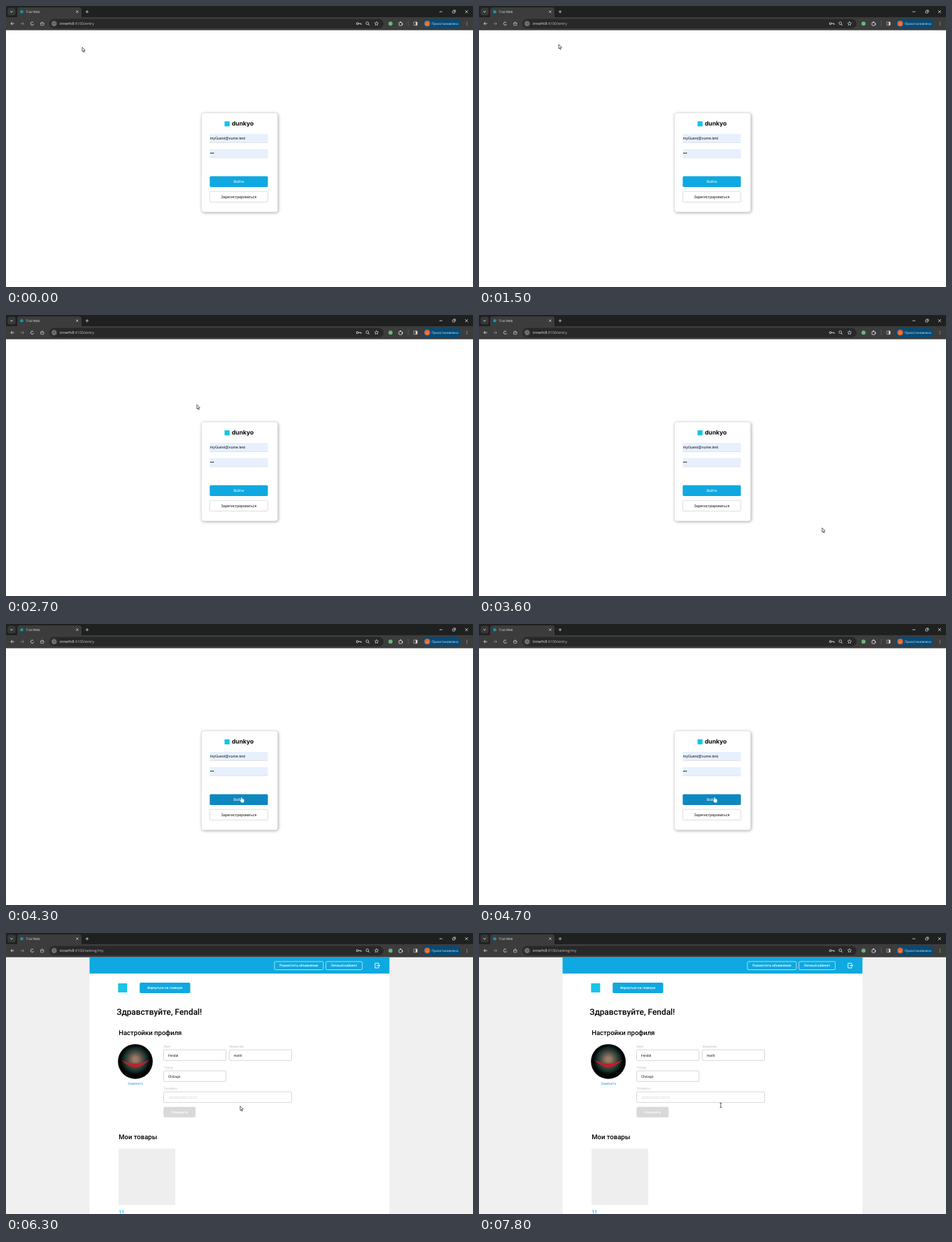
Animation, 668 px wide and 402 px high, one loop 8000 ms. Source, as an HTML page with a canvas:

```html
<!DOCTYPE html>
<html lang="ru">
<head>
<meta charset="utf-8">
<style>
html, body { margin: 0; width: 668px; height: 402px; overflow: hidden; background: #fff; }
canvas { display: block; width: 668px; height: 402px; }
</style>
</head>
<body>
<canvas id="stage"></canvas>
<script>
const W = 668, H = 402, LOOP = 8000, TICK = 100;
const HOVER = 3900, PRESS = 4600, LOADED = 6200, PROFILE = 6300, TEXT_CURSOR = 7700;
const TOP = 34.5, MID = W / 2 - 1;
const ARIAL = '"Liberation Sans", Arial, sans-serif';
const ROBOTO = 'Roboto, sans-serif';
const UI = '"Open Sans", "Noto Sans", sans-serif';
const BLUE = '#0fa8e0', PALE = '#d4d4d4', DIM = '#858585';

const canvas = document.getElementById('stage');
const ratio = window.devicePixelRatio || 1;
canvas.width = W * ratio;
canvas.height = H * ratio;
const c = canvas.getContext('2d');
c.scale(ratio, ratio);
c.textRendering = 'geometricPrecision';

function rect(x, y, w, h, fill, r = 0) {
  c.beginPath();
  c.roundRect(x, y, w, h, r);
  c.fillStyle = fill;
  c.fill();
}

function stroke(color, lw) {
  c.strokeStyle = color;
  c.lineWidth = lw;
  c.stroke();
}

function frame(x, y, w, h, color, r = 0, lw = 0.6) {
  c.beginPath();
  c.roundRect(x, y, w, h, r);
  stroke(color, lw);
}

function disc(x, y, r, fill) {
  c.beginPath();
  c.arc(x, y, r, 0, Math.PI * 2);
  c.fillStyle = fill;
  c.fill();
}

function ring(x, y, r, color, lw = 0.8, from = 0, to = Math.PI * 2) {
  c.beginPath();
  c.arc(x, y, r, from, to);
  stroke(color, lw);
}

function line(color, lw, ...pts) {
  c.beginPath();
  for (let i = 0; i < pts.length; i += 2) c.lineTo(pts[i], pts[i + 1]);
  stroke(color, lw);
}

function cross(x, y, r, turn, color) {
  for (const a of [turn, turn + Math.PI / 2]) {
    const dx = r * Math.cos(a), dy = r * Math.sin(a);
    line(color, 0.8, x - dx, y - dy, x + dx, y + dy);
  }
}

// Arrow with its middle at x, pointing left (-1) or right (1).
function arrow(x, y, dir, size, color) {
  const tip = x + dir * size, back = tip - dir * size * 0.9;
  line(color, 0.9, x - dir * size, y, tip, y);
  line(color, 0.9, back, y - size * 0.9, tip, y, back, y + size * 0.9);
}

function star(x, y, r, color) {
  c.beginPath();
  for (let i = 0; i < 10; i++) {
    const a = i * Math.PI / 5 - Math.PI / 2, d = i % 2 ? r * 0.47 : r;
    c.lineTo(x + d * Math.cos(a), y + d * Math.sin(a));
  }
  c.closePath();
  stroke(color, 0.7);
}

function text(str, x, y, size, color, family, weight = 400, align = 'left') {
  c.font = `${weight} ${size}px ${family}`;
  c.textAlign = align;
  c.fillStyle = color;
  c.fillText(str, x, y);
}

function drawTabs() {
  const y = 8.2;
  rect(0, 0, W, 17, '#1f2020');
  rect(2.3, 2.6, 11.4, 11, '#373838', 3);
  line('#e3e3e3', 0.9, 6.2, y - 0.9, 8, y + 0.9, 9.8, y - 0.9);
  rect(16, 2, 92, 20, '#3c3c3c', 3.5);
  disc(22.5, y, 2.3, '#1597ac');
  text('Trial Web', 28.6, 9.9, 4.6, '#e6e6e6', UI);
  cross(101.8, y, 2.2, Math.PI / 4, '#e0e0e0');
  cross(116, y, 2.2, 0, PALE);
  line('#e8e8e8', 0.8, 620, y, 624.2, y);
  frame(638.8, 7, 3.1, 3.1, '#e8e8e8', 0.4, 0.7);
  line('#e8e8e8', 0.7, 639.9, 6, 642.9, 6, 642.9, 9);
  cross(658.8, y, 2.8, Math.PI / 4, '#e8e8e8');
}

function drawToolbar(path) {
  const y = 25.2;
  rect(0, 16, W, TOP - 16, '#3c3c3c');

  arrow(9.3, y, -1, 2.4, PALE);
  arrow(23.1, y, 1, 2.4, DIM);
  ring(37.5, y, 2.2, PALE, 0.9, 0.3, 5.5);
  frame(49.7, y - 0.4, 4.2, 2.8, PALE);
  line(PALE, 0.8, 49, y, 51.8, y - 2.4, 54.6, y);

  rect(62, 18.4, 478, 13.6, '#282828', 6.8);
  disc(68.8, y, 5, '#3c3c3c');
  ring(68.8, y, 2.6, PALE, 0.7);
  line(PALE, 0.7, 68.8, y - 1.2, 68.8, y + 1.4);
  const host = 'innerhill';
  text(host, 77, 27, 5.33, '#ececec', UI);
  text(':4100/' + path, 77 + c.measureText(host).width, 27, 5.33, '#bdbdbd', UI);

  ring(502.6, y, 1.4, PALE, 1);
  line(PALE, 1, 504, y, 508, y, 508, y + 1.7);
  ring(516.8, y - 0.6, 1.9, PALE);
  line(PALE, 0.9, 518.2, y + 0.8, 520, y + 2.7);
  star(530, y, 2.9, PALE);
  disc(550, y, 2.9, '#67b87b');
  frame(562.1, y - 1.6, 4.4, 4.4, PALE, 0.6, 0.9);
  disc(564.3, y - 2.2, 0.9, PALE);
  disc(567.1, y + 0.6, 0.9, PALE);
  line('#5a6670', 0.7, 575.3, y - 4, 575.3, y + 4);
  frame(583.3, y - 2.3, 4.9, 4.7, PALE, 0.5);
  rect(586, y - 2.3, 2.2, 4.7, PALE);

  rect(596, 18.4, 54.5, 13.6, '#074a76', 6.8);
  disc(602.5, y, 4.1, '#e0642a');
  text('U', 602.5, 26.7, 4, '#ffe6d8', UI, 400, 'center');
  text('Приостановлена', 609, 26.8, 4.6, '#d6eaf8', UI);
  for (const dy of [-2, 0, 2]) disc(659.2, y + dy, 0.55, PALE);
}

function loginColor(t) {
  if (t < HOVER) return BLUE;
  return t === PRESS ? '#0b7db3' : '#0e87bf';
}

function drawLogin(t) {
  const x = 291.4, w = 83.2;
  rect(0, TOP, W, H, '#fff');
  c.save();
  c.shadowColor = 'rgba(0,0,0,.36)';
  c.shadowBlur = 4.5 * ratio;
  c.shadowOffsetX = c.shadowOffsetY = 0.9 * ratio;
  rect(279.6, 153, 109, 141.8, '#fff', 3.6);
  c.restore();
  frame(279.5, 152.9, 109.2, 142, '#dadada', 3.6);

  rect(312.6, 165, 7.2, 7.2, '#12c5e6');
  text('dunkyo', 322.9, 171.2, 8.6, '#0a0a0a', 'Inter, sans-serif', 700);

  for (const y of [183, 204.7]) {
    rect(x, y, w, 12, '#e8f0fe');
    rect(x, y + 12, w, 0.6, '#c4c6cc');
  }
  text('myGuest@vume.test', x + 0.3, 190.8, 5.4, '#111', ARIAL);
  for (let i = 0; i < 3; i++) disc(292.8 + i * 1.9, 210.5, 0.8, '#111');

  rect(x, 243.5, w, 15.6, loginColor(t), 1.8);
  text('Войти', MID, 253.2, 5.4, '#fff', ARIAL, 400, 'center');
  frame(x, 265.2, w, 15.3, '#c8c8c8', 1.8);
  text('Зарегистрироваться', MID, 274.8, 5.4, '#111', ARIAL, 400, 'center');
}

// Dark disc with a soft glow and one plain red band.
function drawAvatar(x, y) {
  const glow = c.createRadialGradient(x, y - 3, 3, x, y - 2, 21);
  glow.addColorStop(0, '#9a7b68');
  glow.addColorStop(0.45, '#4a4a42');
  glow.addColorStop(0.75, '#14302b');
  glow.addColorStop(1, '#050505');
  disc(x, y, 24.9, glow);
  c.beginPath();
  c.moveTo(x - 20, y - 2);
  c.quadraticCurveTo(x, y + 8, x + 20, y - 2);
  c.quadraticCurveTo(x, y + 18, x - 20, y - 2);
  c.fillStyle = '#bd2029';
  c.fill();
}

function label(str, x, y, w, h) {
  text(str, x + w / 2, y + h / 2 + 1.7, 4.8, '#fff', ROBOTO, 500, 'center');
}

function field(name, value, col, row, w, ink = '#111') {
  const x = 225.5 + col * 93.9, y = 167 + row * 30;
  text(name, x, y - 3.4, 4.8, '#c0c0c0', ROBOTO);
  frame(x, y + 0.2, w, 15.2, '#bdbdbd', 1.7);
  text(value, x + 6.4, y + 9.5, 4.8, ink, ROBOTO);
}

function drawProfile() {
  const left = 119.5, width = 429;
  rect(0, TOP, W, H, '#f0f0f0');
  rect(left, TOP, width, H, '#fff');
  rect(left, TOP, width, 23.4, BLUE);

  for (const [str, x, w] of [['Разместить объявление', 383.9, 70], ['Личный кабинет', 457.6, 52]]) {
    frame(x, 40.9, w, 11.6, '#e8f7fd', 1.6, 0.7);
    label(str, x, 40.9, w, 11.6);
  }
  line('#fff', 0.9, 533, 44.6, 533, 43.2, 527.9, 43.2, 527.9, 50, 533, 50, 533, 48.5);
  arrow(532.5, 46.6, 1, 2.2, '#fff');

  rect(160.3, 72, 13, 13, '#17c4e8');
  rect(191.2, 71, 72.3, 15, BLUE, 1.8);
  label('Вернуться на главную', 191.2, 71, 72.3, 15);

  text('Здравствуйте, Fendal!', 158.2, 116.8, 11.9, '#000', ROBOTO, 500);
  text('Настройки профиля', 161.2, 145.5, 9.5, '#000', ROBOTO, 500);
  drawAvatar(185, 183.8);
  text('Заменить', 185.3, 217.2, 4.8, '#1f9be0', ROBOTO, 400, 'center');

  field('Имя', 'Fendal', 0, 0, 89.2);
  field('Фамилия', 'Harlit', 1, 0, 89.2);
  field('Город', 'Chicago', 0, 1, 89.2);
  field('Телефон', '+0(XXX)XXX-XX-XX', 0, 2, 183.1, '#d0d0d0');
  rect(225.4, 248.8, 45.8, 15, '#d9d9d9', 1.8);
  label('Сохранить', 225.4, 248.8, 45.8, 15);

  text('Мои товары', 161.2, 295, 9.5, '#000', ROBOTO, 500);
  rect(161.1, 308.5, 81, 80.5, '#eee');
  text('11', 161.6, 401.2, 6.6, BLUE, ROBOTO, 500);
}

// Pointer stops: time, x, y. It eases from one to the next.
const stops = [
  [1400, 109, 59], [1500, 114, 55], [2000, 330, 170], [2500, 239, 139],
  [2700, 273, 128.3], [2800, 273, 128.3], [3200, 569, 297], [3400, 545, 324],
  [4000, 336, 249], [4300, 335, 247.6], [7400, 335, 247.6], [7800, 345.8, 246.4]
];

function pointerAt(t) {
  const i = stops.findIndex(s => s[0] >= t);
  const [t1, x1, y1] = stops.at(i);
  const [t0, x0, y0] = stops[i - 1] || [t1 - LOOP, x1, y1];
  if (i < 0) return [x1, y1];
  const u = (t - t0) / (t1 - t0), k = u * u * (3 - 2 * u);
  return [x0 + (x1 - x0) * k, y0 + (y1 - y0) * k];
}

function drawArrow(x, y) {
  c.beginPath();
  c.moveTo(x, y);
  for (const [dx, dy] of [[0, 6.1], [1.4, 4.9], [2.4, 7.2], [3.3, 6.8], [2.4, 4.6], [4.3, 4.4]]) {
    c.lineTo(x + dx, y + dy);
  }
  c.closePath();
  c.fillStyle = '#fff';
  c.fill();
  stroke('#222', 0.7);
}

function drawHand(x, y) {
  rect(x + 1.5, y + 0.3, 1.3, 5, '#fff', 0.6);
  rect(x + 1.2, y + 3.2, 4.2, 4.8, '#fff', 1.4);
  line('#fff', 1.1, x + 0.2, y + 4.8, x + 2, y + 7);
}

function drawBeam(x, y) {
  line('#222', 0.7, x, y - 3, x, y + 3);
  for (const dy of [-3, 3]) line('#222', 0.7, x - 1.4, y + dy, x + 1.4, y + dy);
}

function drawPointer(t) {
  const [x, y] = pointerAt(t);
  if (t >= TEXT_CURSOR) drawBeam(x, y);
  else if (t >= HOVER && t < LOADED) drawHand(x, y);
  else drawArrow(x, y);
}

function draw(now) {
  const t = Math.floor((now % LOOP) / TICK) * TICK;
  const login = t < PROFILE;
  if (login) drawLogin(t);
  else drawProfile();
  drawTabs();
  drawToolbar(login ? 'entry' : 'setting/my');
  drawPointer(t);
}

const start = performance.now();
function loop() {
  draw(performance.now() - start);
  requestAnimationFrame(loop);
}
loop();
</script>
</body>
</html>
```
